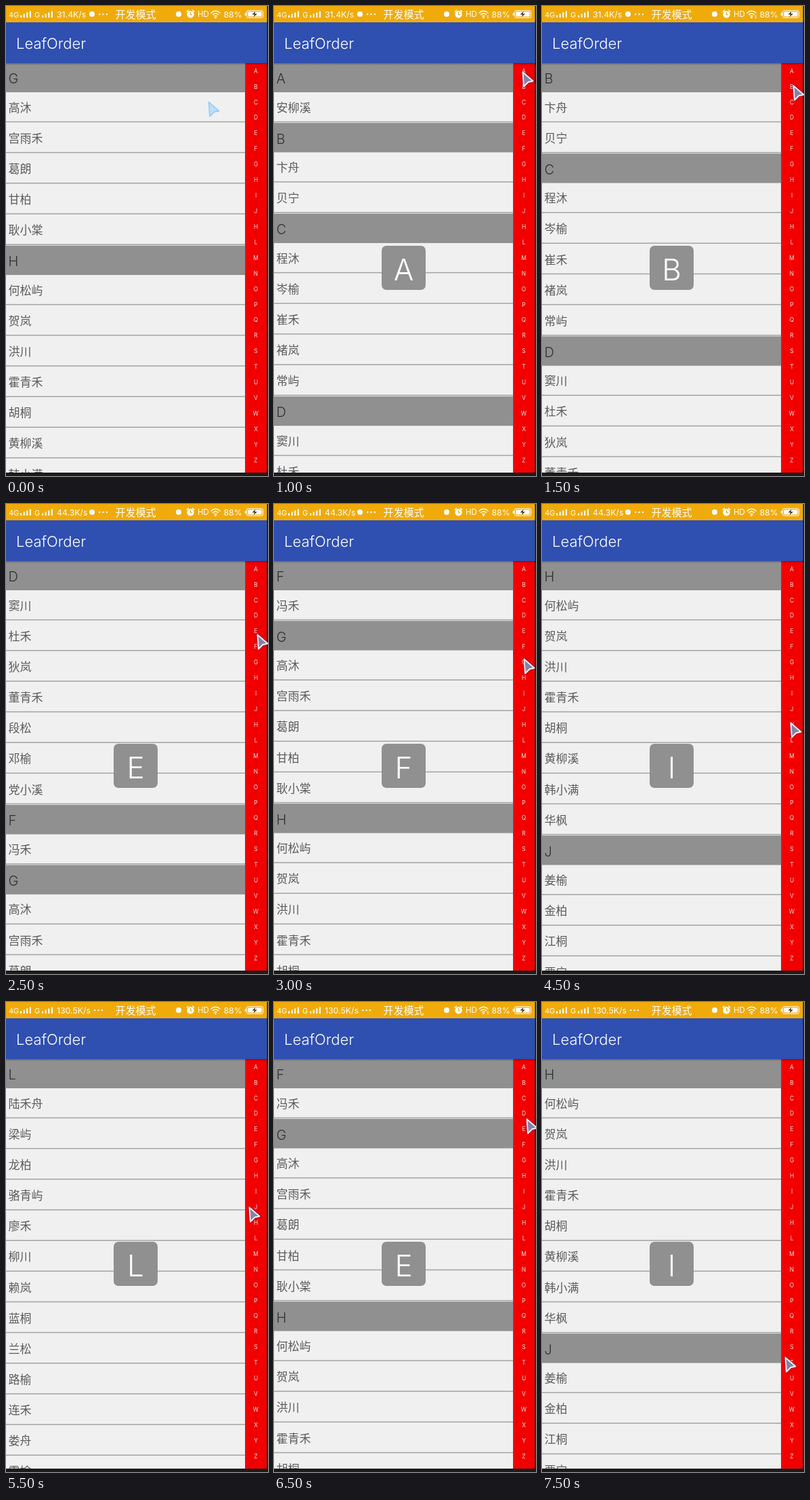
Animation, 387 px wide and 692 px high, one loop 8000 ms. Source, as an HTML page:

```html
<!DOCTYPE html>
<html lang="zh">
<head>
<meta charset="utf-8">
<style>
  html, body { margin: 0; width: 100%; height: 100%; overflow: hidden; background: #1d1a1a; }
  svg { display: block; font-family: Inter, Roboto, sans-serif; }
  .cjk { font-family: "Noto Sans CJK SC", "Noto Sans CJK", sans-serif; }
  .head { font-size: 20px; font-weight: 300; fill: #2b332b; }
  .row { font-size: 17px; fill: #5c5c5c; }
  .index { font-size: 8.4px; fill: #ffe4e4; text-anchor: middle; }
  .status { fill: #fff; font-size: 12px; }
  #cursor { filter: drop-shadow(0 0 .8px #3f3a66); }
</style>
</head>
<body>
<svg width="387" height="692" viewBox="0 0 387 692">
  <defs>
    <linearGradient id="shade" x2="0" y2="1">
      <stop stop-color="#000" stop-opacity=".3"/>
      <stop offset="1" stop-color="#000" stop-opacity="0"/>
    </linearGradient>
    <clipPath id="view"><path d="M0 83H353.400V687H0Z"/></clipPath>
  </defs>

  <rect y="83" width="353.400" height="604" fill="#f0f0f0"/>
  <g id="list" clip-path="url(#view)"></g>
  <rect x="353.400" y="83" width="32.100" height="604" fill="#f20000"/>
  <g id="letters" class="index"></g>

  <rect width="387" height="24" fill="#f0ab0b"/>
  <rect y="24" width="387" height="60" fill="#2f4fb1"/>
  <rect y="84" width="387" height="3" fill="url(#shade)"/>
  <text x="15" y="63" font-size="22" font-weight="300" fill="#fff">LeafOrder</text>

  <g class="status">
    <text x="4" y="17" font-size="11">4G</text>
    <text x="42" y="17" font-size="11">G</text>
    <g id="signal"></g>
    <text id="speed" x="75" y="16.5" font-size="12.300"></text>
    <circle id="plug" cx="127" cy="12" r="4"/>
    <path id="dots" d="M137 11h2.2v2.2h-2.2zM142.4 11h2.2v2.2h-2.2zM147.8 11h2.2v2.2h-2.2z"/>
    <text class="cjk" x="161.5" y="18" font-size="15">开发模式</text>
    <circle cx="255" cy="12" r="4"/>
    <circle cx="272.5" cy="12.3" r="5.2"/>
    <path d="M272.5 9v3.6h2.6" fill="none" stroke="#f0ab0b" stroke-width="1.2"/>
    <path d="M266.8 8.6l3-2.6M278.2 8.6l-3-2.6" stroke="#fff" stroke-width="1.5"/>
    <text x="283" y="16.3" font-size="11.5">HD</text>
    <path d="M302.5 10.5q7-6.5 14 0M305 13q4.500-4 9 0M307.300 15.300q2.200-1.800 4.400 0" fill="none" stroke="#fff" stroke-width="1.4"/>
    <circle cx="309.500" cy="17" r="1.200"/>
    <path id="traffic" d="M315 14h1.600v1.400h-1.600zM315 16.500h1.600v1.400h-1.600z"/>
    <text x="321.500" y="16.500" font-size="12.300">88%</text>
    <rect x="355.500" y="6.800" width="24" height="10.400" rx="2" fill="none" stroke="#fff"/>
    <rect x="357.300" y="8.600" width="20.400" height="6.800" rx=".8"/>
    <rect x="352.800" y="10" width="1.700" height="4"/>
    <path d="M368.500 8l-5 4.600h3.600l-1.600 3.600 5.500-4.800h-3.600z" fill="#3a2a05"/>
  </g>

  <g id="popup">
    <rect x="159" y="353" width="65" height="65" rx="7" fill="#909090"/>
    <text id="big" x="191.500" y="403.800" font-size="44" font-weight="300" fill="#fff" text-anchor="middle"></text>
  </g>
  <path d="M385.500 0H387V692H0V687H385.500Z" fill="#1d1a1a"/>
  <path id="cursor" d="M.5 .5L15.500 13.500 8.500 15 2 21.500Z" stroke-width="1.800" stroke-linejoin="round"/>
</svg>
<script>
const $ = id => document.getElementById(id);
const HEAD = 43.3, ROW = 45.15, TOP = 83.7, BOTTOM = 687, STEP = 500;

const sections = {
  A: '安柳溪',
  B: '卞舟 贝宁',
  C: '程沐 岑榆 崔禾 褚岚 常屿',
  D: '窦川 杜禾 狄岚 董青禾 段松 邓榆 党小溪',
  F: '冯禾',
  G: '高沐 宫雨禾 葛朗 甘柏 耿小棠',
  H: '何松屿 贺岚 洪川 霍青禾 胡桐 黄柳溪 韩小满 华枫',
  J: '姜榆 金柏 江桐 贾宁',
  L: '陆禾舟 梁屿 龙柏 骆青屿 廖禾 柳川 赖岚 蓝桐 兰松 路榆 连禾 娄舟 雷榆'
};

// popup letter, first section in view, pointer x, pointer y
const steps = [
  ['', 'G', 299, 141], ['', 'G', 363, 102], ['A', 'A', 367, 97], ['B', 'B', 371, 117],
  ['D', 'D', 371, 151], ['E', 'D', 371, 192], ['F', 'F', 369, 228], ['H', 'H', 365, 251],
  ['H', 'H', 370, 288], ['I', 'H', 367, 322], ['I', 'H', 361, 380], ['L', 'L', 359, 302],
  ['G', 'G', 372, 232], ['E', 'F', 373, 172], ['G', 'G', 368, 340], ['I', 'H', 359, 523]
];

const rect = (x, y, w, h, fill) =>
  `<rect x="${x}" y="${y}" width="${w}" height="${h}" fill="${fill}"/>`;
const label = (cls, x, y, text) => `<text class="${cls}" x="${x}" y="${y}">${text}</text>`;

function listFrom(first) {
  let y = TOP, out = '';
  for (const key of Object.keys(sections).filter(k => k >= first)) {
    out += rect(0, y, 354, HEAD, '#909090') + label('head', 3.5, y + 30.4, key);
    y += HEAD;
    for (const name of sections[key].split(' ')) {
      if (y > BOTTOM) return out;
      out += label('row cjk', 3.5, y + 28.6, name) + rect(0, y + 42.8, 354, 1.5, '#a2a5a0');
      y += ROW;
    }
  }
  return out;
}

$('letters').innerHTML = [...'ABCDEFGHIJHLMNOPQRSTUVWXYZ']
  .map((c, i) => label('', 369, 98.7 + 22.92 * i, c)).join('');
$('signal').innerHTML = [21, 53].map(x => [0, 1, 2, 3]
  .map(i => rect(x + 4.6 * i, 13.5 - 2 * i, 2.1, 3.5 + 2 * i, '#fff')).join('')).join('');

let shown = -1;
function draw(now) {
  const n = Math.floor(now / STEP) % steps.length;
  if (n !== shown) {
    shown = n;
    const [letter, first, x, y] = steps[n];
    const pressed = letter !== '', plugged = n < 10;
    $('list').innerHTML = listFrom(first);
    $('big').textContent = letter;
    $('popup').style.display = pressed ? '' : 'none';
    $('speed').textContent = n < 4 ? '31.4K/s' : plugged ? '44.3K/s' : '130.5K/s';
    $('plug').style.display = plugged ? '' : 'none';
    $('dots').setAttribute('transform', `translate(${plugged ? 0 : -7} 0)`);
    $('traffic').style.display = [2, 3, 12, 13, 14].includes(n) ? '' : 'none';
    const cursor = $('cursor');
    cursor.setAttribute('transform', `translate(${x} ${y})`);
    cursor.setAttribute('fill', pressed ? '#8583a3' : '#b9e0fa');
    cursor.setAttribute('stroke', pressed ? '#f4f0fa' : '#9fcdf0');
    cursor.style.filter = pressed ? '' : 'none';
  }
  requestAnimationFrame(draw);
}
draw(performance.now());
</script>
</body>
</html>
```
